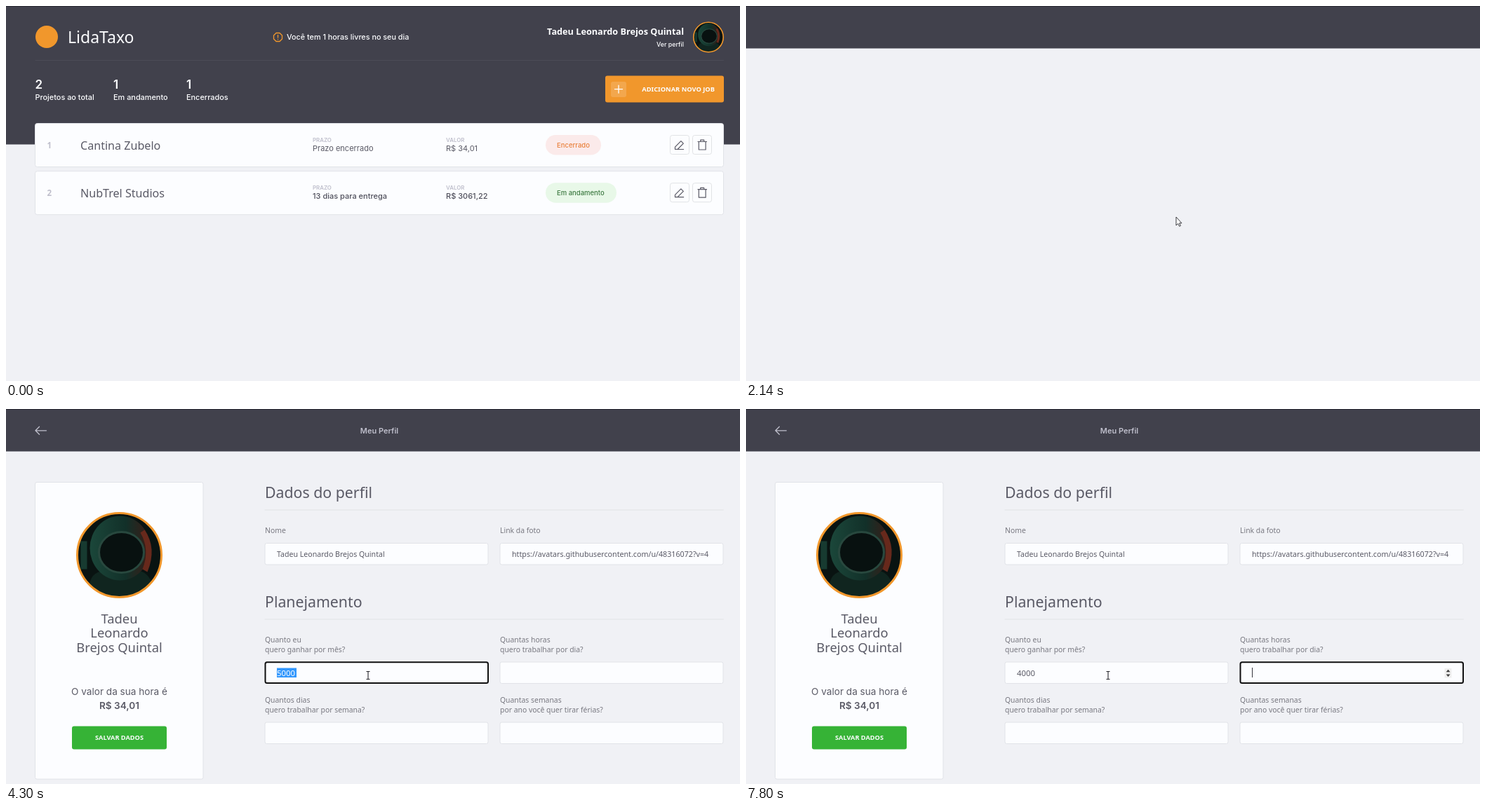
Animation, 1046 px wide and 535 px high, one loop 8000 ms. Source, as an HTML page:

```html
<!DOCTYPE html>
<html lang="pt-BR">
<head>
<meta charset="utf-8">
<title>Meu Perfil</title>
<style>
html, body { margin: 0; width: 100%; height: 100%; overflow: hidden; background: #f0f1f5; }
svg { display: block; width: 100vw; height: 100vh; }
text { white-space: pre; }
.sans { font-family: "Noto Sans", "Open Sans", sans-serif; }
.inter { font-family: Inter, Roboto, sans-serif; }
.card { fill: #fcfdff; stroke: #e1e3e8; }
.line { fill: none; stroke-linecap: round; stroke-linejoin: round; }
</style>
</head>
<body>
<svg id="stage" viewBox="0 0 1046 535"></svg>
<script>
const LOOP = 8000, STEP = 76.9;
const DARK = '#41414c', ORANGE = '#f1972c', INK = '#5a5a66', GREY = '#787880', PALE = '#bfbfcc';
const USER = ['Tadeu', 'Leonardo', 'Brejos Quintal'], FULL = USER.join(' ');

const text = (font, x, y, size, weight, fill, str, anchor = 'start', id = '') =>
  `<text ${id && `id="${id}"`} class="${font}" x="${x}" y="${y}" font-size="${size}" font-weight="${weight}" fill="${fill}" text-anchor="${anchor}">${str}</text>`;
const sans = (...a) => text('sans', ...a);
const inter = (...a) => text('inter', ...a);
const rect = (x, y, w, h, rx, attrs) => `<rect x="${x}" y="${y}" width="${w}" height="${h}" rx="${rx}" ${attrs}/>`;
const line = (d, color, width = 1) => `<path class="line" d="${d}" stroke="${color}" stroke-width="${width}"/>`;
const header = h => rect(0, 0, 1046, h, 0, `fill="${DARK}"`) + rect(0, 0, 1046, 1, 0, 'fill="#2c2c35"');

// Portrait in a circle of radius 60 around the origin
const avatar = (x, y, r, border) => `<g transform="translate(${x} ${y}) scale(${r / 60})" clip-path="url(#disc)">
  <circle r="60" fill="#091311"/>
  <path d="M-42 60Q-48 24-20 22H28Q50 28 48 60Z" fill="#10251f"/>
  <ellipse cx="1" cy="-10" rx="43" ry="46" fill="url(#helmet)"/>
  <ellipse cx="3" cy="-4" rx="32" ry="29" fill="#081110" stroke="#28483e" stroke-width="3"/>
  <path d="M36-36Q54-10 40 24L33 20Q44-8 30-32Z" fill="#67291c"/>
  <path d="M-55-20h9v40h-9Z" fill="#173a30"/></g>
  <circle cx="${x}" cy="${y}" r="${r}" fill="none" stroke="${ORANGE}" stroke-width="${border}"/>`;

const stat = (x, n, label) => inter(x, 118, 17, 600, '#fcfdff', n) + inter(x, 134, 10.9, 500, '#fcfdff', label);

const iconBox = (x, d) => rect(x, 184.5, 27, 27, 3, 'fill="#fcfdff" stroke="#e1e3e5"') + line(d, INK, 1.2);

function job(i, name, due, price, status, bold) {
  const weight = bold ? 500 : 400, color = bold ? '#4f4f5b' : INK;
  const [pill, ink, width] = bold ? ['#e8f8e8', '#3d7a42', 101] : ['#fbeaea', '#e9803c', 79];
  return `<g transform="translate(0 ${i * 68.2})">
    <rect id="card${i}" class="card" x="41.5" y="167.5" width="981" height="62" rx="3"/>
    <rect id="bar${i}" x="41.5" y="167" width="2.5" height="0" rx="1" fill="${ORANGE}"/>` +
    sans(58.5, 203, 11.5, 600, PALE, i + 1) +
    sans(106, 205, 16.1, 500, INK, name) +
    inter(437, 194, 7.9, 600, PALE, 'PRAZO') + inter(437, 207.3, 11, weight, color, due) +
    inter(627, 194, 7.9, 600, PALE, 'VALOR') + inter(627, 207.3, 11, weight, color, price) +
    rect(769, 184, width, 28.5, 14.2, `fill="${pill}"`) + inter(785, 201.8, 9.5, 500, ink, status) +
    iconBox(946.5, 'M957 204.5h-3.5v-3.4l8.4-8.4 3.4 3.4-8.3 8.4h8.6') +
    iconBox(978.5, 'M986 193.5h12.5M989.7 193.5v-2.3h5v2.3M987.3 193.5v11.5h9.8v-11.5') + '</g>';
}

const home = header(197.5) +
  `<circle cx="58" cy="44" r="16" fill="${ORANGE}"/>` +
  sans(88, 53, 23, 500, '#fcfdff', 'LidaTaxo') +
  line('M385 38.5h5l3.5 3.5v5l-3.5 3.5h-5l-3.5-3.5v-5ZM387.5 41.5v3.6M387.5 47.4v.1', ORANGE, 1.3) +
  inter(400, 48.4, 10.8, 500, '#fcfdff', 'Você tem 1 horas livres no seu dia') +
  sans(966, 41, 12.7, 600, '#fcfdff', FULL, 'end') +
  inter(966, 58, 8.9, 500, '#fcfdff', 'Ver perfil', 'end') +
  avatar(1001, 44.5, 21.2, 1.6) +
  line('M42 77.5H1022.5', '#4b4b56') +
  stat(41.5, 2, 'Projetos ao total') + stat(153, 1, 'Em andamento') + stat(257, 1, 'Encerrados') +
  rect(854, 99.5, 169, 38, 3, `id="add" fill="${ORANGE}"`) +
  rect(862, 108, 22, 22, 3, 'fill="#fff" fill-opacity=".16"') +
  line('M867.5 118.7h11M873 113.2v11', '#fff', 1.3) +
  sans(1010, 122, 9.3, 700, '#fcfdff', 'ADICIONAR NOVO JOB', 'end') +
  job(0, 'Cantina Zubelo', 'Prazo encerrado', 'R$ 34,01', 'Encerrado', false) +
  job(1, 'NubTrel Studios', '13 dias para entrega', 'R$ 3061,22', 'Em andamento', true);

const label = (x, y, ...rows) => rows.map((s, i) => sans(x, y + i * 13.7, 10.4, 500, GREY, s)).join('');
const input = (x, y) => rect(x + .5, y + .5, 318, 30.5, 2.5, 'class="card"');
const ring = (id, x) => rect(x + .5, 361.3, 317.5, 29.8, 2.5, `id="${id}" fill="none" stroke="#101010" stroke-width="2"`);
const section = (y, title) => sans(369, y, 21.3, 500, INK, title) + line(`M369 ${y + 17.5}H1022.5`, '#e1e3e5');

const profile = header(60.5) + '<g id="content">' +
  line('M57.5 30.8H42M47.5 25.3L42 30.8l5.5 5.5', PALE, 1.3) +
  inter(532, 35.3, 11, 600, PALE, 'Meu Perfil', 'middle') +
  rect(41.5, 104.5, 239.5, 423.5, 2.5, 'class="card"') +
  avatar(161.5, 208.5, 60, 3) +
  USER.map((s, i) => sans(161.5, 306 + i * 20.4, 18.4, 500, INK, s, 'middle')).join('') +
  inter(161.5, 408, 13.6, 400, INK, 'O valor da sua hora é', 'middle') +
  inter(161.5, 428, 13.6, 600, INK, 'R$ 34,01', 'middle') +
  rect(94, 452.5, 135, 33, 3, 'fill="#36b336"') +
  sans(161.5, 472.3, 9.2, 700, '#fcfdff', 'SALVAR DADOS', 'middle') +
  section(126.5, 'Dados do perfil') + section(282.5, 'Planejamento') +
  label(369, 177.3, 'Nome') + label(704, 177.3, 'Link da foto') +
  label(369, 333.3, 'Quanto eu', 'quero ganhar por mês?') +
  label(704, 333.3, 'Quantas horas', 'quero trabalhar por dia?') +
  label(369, 419.3, 'Quantos dias', 'quero trabalhar por semana?') +
  label(704, 419.3, 'Quantas semanas', 'por ano você quer tirar férias?') +
  [191, 360.5, 446.5].map(y => input(368.5, y) + input(703.5, y)).join('') +
  sans(386, 210.8, 10.6, 500, INK, FULL) +
  sans(721, 210.8, 10.7, 500, INK, 'https://avatars.githubusercontent.com/u/48316072?v=4') +
  ring('ring1', 369) + ring('ring2', 704) +
  rect(386, 369.5, 28, 13.5, 0, 'id="selection" fill="#3297fd"') +
  sans(386, 380.8, 11.4, 500, INK, '5000', 'start', 'amount') +
  rect(0, 369, 1, 14, 0, 'id="caret" fill="#33333c"') +
  '<g id="spinner">' + rect(995.5, 370, 10, 13.5, 0, 'fill="#efefef"') +
  '<path d="M997.7 375.2l2.9-3.4 2.9 3.4ZM997.7 378.6l2.9 3.4 2.9-3.4Z" fill="#3c3c3c"/></g>' +
  '<g id="suggest">' + rect(368.5, 392.5, 131, 35.7, 2.5, 'fill="#27292d"') +
  inter(377, 413.6, 8, 500, '#fff', '4000') + '</g></g>';

document.getElementById('stage').innerHTML = `<defs>
  <clipPath id="disc"><circle r="60"/></clipPath>
  <linearGradient id="helmet"><stop stop-color="#1b473a"/><stop offset=".6" stop-color="#123029"/><stop offset="1" stop-color="#3b1b15"/></linearGradient></defs>
  <g id="home">${home}</g><g id="profile">${profile}</g>
  <g id="pointer" stroke-linejoin="round">
  <path id="arrow" d="M0 0V12L2.7 9.4 4.6 13.3 6.4 12.5 4.6 8.8H8Z" fill="#fff" stroke="#26262c" stroke-width=".9"/>
  <path id="hand" d="M-1 8V1.2a1.1 1.1 0 0 1 2.2 0V5l5 1.2q1.4.4 1.2 1.9L6.5 14.5H.5L-3.2 9.5q.6-1.6 2.2-.3Z" fill="#fff" stroke="#26262c" stroke-width=".9"/>
  <path id="beam" d="M-2.5-5.5h5M0-5.5v11M-2.5 5.5h5" fill="none" stroke="#26262c" stroke-width="1.1"/></g>`;

const el = id => document.getElementById(id);
const show = (id, on) => el(id).style.display = on ? '' : 'none';
const clamp = v => Math.max(0, Math.min(1, v));
const within = (t, spans) => spans.some(([a, b]) => t >= a && t < b);

// time, x, y
const PATH = [[57, 700, 500], [300, 760, 380], [600, 850, 215], [749, 876, 154], [826, 884, 133],
  [903, 893, 112], [1057, 912, 84], [1288, 937, 52], [1440, 941, 49], [1740, 941, 49],
  [2133, 613, 301], [2450, 572, 332], [2825, 551, 339], [3080, 512, 366], [3200, 510, 377],
  [4150, 510, 377], [4270, 516, 380], [LOOP, 516, 380]];
// hover spans of each row
const HOVER = [[[563, 720], [1935, 2028]], [[452, 551], [2035, 2200]]];
const BLINK = [[3460, 3610], [5080, 5310], [5470, 5700], [5770, 6170], [6320, 6640],
  [6640, 6870], [7020, 7270], [7420, 7650], [7800, LOOP]];

function pointerAt(t) {
  const i = Math.max(1, PATH.findIndex(p => p[0] >= t));
  const [a, b] = [PATH[i - 1], PATH[i]], k = clamp((t - a[0]) / (b[0] - a[0]));
  return [a[1] + (b[1] - a[1]) * k, a[2] + (b[2] - a[2]) * k];
}

function draw(t) {
  const q = Math.floor((t + 20) / STEP) * STEP - 20;
  const onHome = t < 2060, [x, y] = pointerAt(q);
  show('home', onHome);
  show('profile', !onHome);

  const onAdd = onHome && x > 854 && y > 99 && y < 137;
  const onLink = onHome && x > 925 && y < 60;
  const onField = t >= 3230;
  el('add').setAttribute('fill', onAdd ? '#f5a343' : ORANGE);
  HOVER.forEach((spans, i) => {
    const k = Math.max(...spans.map(([a, b]) => clamp(Math.min((q - a) / 140, 1 - (q - b) / 140))));
    el('bar' + i).setAttribute('height', 62 * k);
    el('card' + i).style.fill = k > 0 ? '#fff' : '';
  });

  el('content').style.opacity = 1 - (1 - clamp((q - 2134) / 520)) ** 2;
  const first = t >= 3460 && t < 6640, second = t >= 6640;
  const selected = t >= 3920 && t < 5080;
  const typed = t < 5080 ? '5000' : '4000'.slice(0, t < 5770 ? 1 : t < 5940 ? 2 : t < 6490 ? 3 : 4);
  show('ring1', first);
  show('ring2', second);
  show('spinner', second);
  show('selection', selected);
  show('suggest', t >= 5080 && t < 6490);
  el('amount').textContent = typed;
  el('amount').setAttribute('fill', selected ? '#fff' : INK);
  show('caret', within(t, BLINK));
  el('caret').setAttribute('x', second ? 721 : Math.floor(386 + 6.52 * typed.length));

  show('pointer', q > 0);
  el('pointer').setAttribute('transform', `translate(${x} ${y})`);
  show('hand', onAdd || onLink);
  show('beam', onField);
  show('arrow', !onAdd && !onLink && !onField);
}

const start = performance.now();
function tick() {
  draw((performance.now() - start) % LOOP);
  requestAnimationFrame(tick);
}
tick();
</script>
</body>
</html>
```
